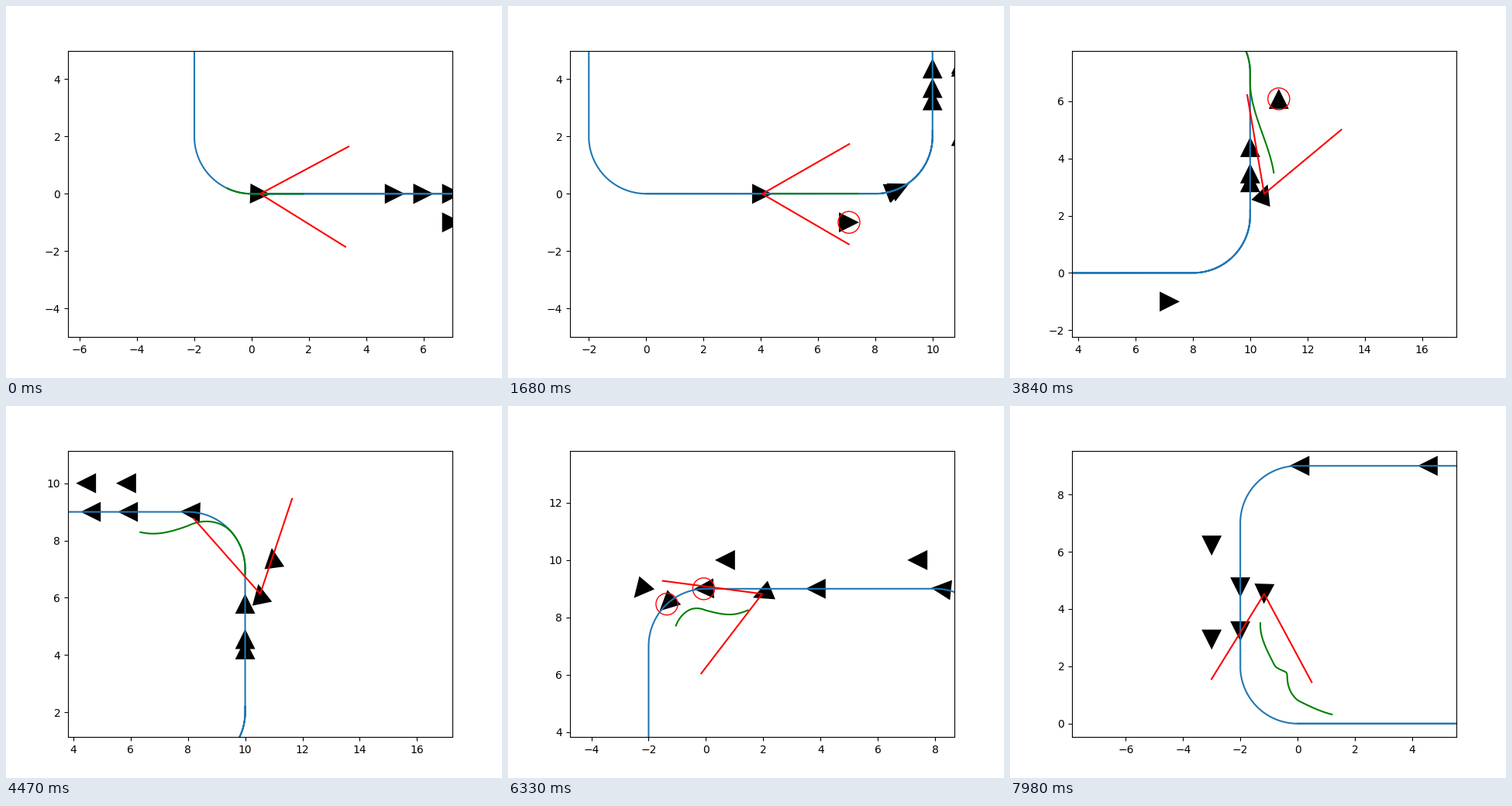
A matplotlib script for the animation above (8000 ms loop, 640 px wide and 480 px high).

```python
import numpy as np
import matplotlib.pyplot as plt
from matplotlib.animation import FuncAnimation
from matplotlib.patches import Circle, Polygon

FRAMES, LOOP_MS = 267, 8000
RADIUS, SIZE = 2.0, 0.35
VIEW_X, VIEW_Y = 6.71, 5.0
SIGHT, HALF_FOV = 3.5, np.radians(30)

# The lane is a rounded rectangle: four straights, each ending in a left bend
STRAIGHTS = [8, 5, 8, 5]
BEND = RADIUS * np.pi / 2
LAP = sum(STRAIGHTS) + 4 * BEND

# Start and speed per frame of the traffic in the inner and outer lane
INNER = [(5, 0.0667), (6, 0.0517), (6, 0.0493), (7, 0.0965), (8, 0.0985),
         (9, 0.0685)]
OUTER = [(7, 0.0015), (8, 0.0564), (9, 0.0835), (8, 0.0996)]
TRAFFIC = [(0, *car) for car in INNER] + [(1, *car) for car in OUTER]

# Driver: frame, distance along the lane, plan start and end ahead of it
JOURNEY = np.array([
    (0, 0.3, -1.18, 1.5), (56, 4.054, 0.35, 3.35), (96, 8.052, 0.3, 4.04),
    (128, 11.902, 0.74, 5.8), (171, 19.06, 0.65, 5.52),
    (211, 25.318, 0.5, 3.91), (243, 28.9, 0.8, 5.6), (266, 32.895, 1.02, 6.87),
]).T

# Driver's drift from the lane: distance, offset to the right, slope
DRIFT = np.array([
    (0, -0.011, 0.06), (2, 0, 0), (8.05, 0, -0.011), (11.9, 0.49, 0.368),
    (12.9, 0.8, 0), (19.06, -0.32, -0.172), (20.7, -0.69, 0), (23.6, 0.06, 0),
    (25.32, -0.18, -0.416), (28.9, -0.72, 0), (33, -0.831, 0.038),
]).T

# Planned swerves: distance and offset, eased from one to the next
SWERVES = np.array([
    (9.6, 0), (12.2, 0.86), (15.8, 0), (17.5, 0), (20.5, -0.76), (23.3, 0),
    (24, 0), (26.45, -0.9), (28.1, -0.615), (30, -0.8), (34, -0.7),
    (36.5, -1.55), (40.3, -0.25),
]).T


def hermite(xs, ys, slopes, x):
    x = np.clip(x, xs[0], xs[-1])
    k = np.clip(np.searchsorted(xs, x, side="right") - 1, 0, len(xs) - 2)
    h = xs[k + 1] - xs[k]
    u = (x - xs[k]) / h
    ease = u * u * (3 - 2 * u)
    return (ys[k] + (ys[k + 1] - ys[k]) * ease
            + u * (1 - u) * h * ((1 - u) * slopes[k] - u * slopes[k + 1]))


def track(s, d=0.0):
    """Position and heading at distance s, d units right of the lane."""
    u = np.mod(s, LAP) + 0 * d
    x, y, heading = np.zeros((3,) + np.shape(u))
    x0 = y0 = h = 0.0
    for length in STRAIGHTS:
        c, n = np.cos(h), np.sin(h)
        x1, y1 = x0 + length * c, y0 + length * n
        cx, cy = x1 - RADIUS * n, y1 + RADIUS * c
        a = h + (u - length) / RADIUS
        parts = [(u >= 0) & (u < length), (u >= length) & (u < length + BEND)]
        x = np.select(parts, [x0 + u * c + d * n,
                              cx + (RADIUS + d) * np.sin(a)], x)
        y = np.select(parts, [y0 + u * n - d * c,
                              cy - (RADIUS + d) * np.cos(a)], y)
        heading = np.select(parts, [h, a], heading)
        x0, y0 = x1 + RADIUS * (c - n), y1 + RADIUS * (c + n)
        h += np.pi / 2
        u = u - length - BEND
    return x, y, heading


def drive(i):
    """Driver's distance, position and heading."""
    times, dist = JOURNEY[:2]
    s = hermite(times, dist, np.gradient(dist, times), i)
    around = s + np.array([-0.001, 0, 0.001])
    x, y, _ = track(around, hermite(*DRIFT, around))
    return s, x[1], y[1], np.arctan2(y[2] - y[0], x[2] - x[0])


def plan(i, s):
    times, _, near, far = JOURNEY
    ahead = s + np.linspace(np.interp(i, times, near),
                            np.interp(i, times, far), 61)
    dist, offset = SWERVES
    return track(ahead, hermite(dist, offset, 0 * dist, ahead))[:2]


def triangle(x, y, heading):
    c, n = np.cos(heading), np.sin(heading)
    shape = SIZE * np.array([(1, 0), (-1, 1), (-1, -1)])
    return shape @ np.array([(c, n), (-n, c)]) + (x, y)


def add_robot():
    return ax.add_patch(Polygon(np.zeros((3, 2)), fc="black", lw=0))


fig, ax = plt.subplots(figsize=(6.4, 4.8), dpi=100)

robots = [add_robot() for _ in TRAFFIC]
driver = add_robot()
rings = [ax.add_patch(Circle((0, 0), 0.38, fill=False, ec="red", lw=1))
         for _ in TRAFFIC]

lane_x, lane_y, _ = track(np.linspace(0, LAP + 8 + BEND + 0.2, 1000))
ax.plot(lane_x, lane_y, color="C0", lw=1.5)
path, = ax.plot([], [], color="green", lw=1.5)
sight, = ax.plot([], [], color="red", lw=1.5)


def update(i):
    s, x, y, heading = drive(i)
    driver.set_xy(triangle(x, y, heading))

    for robot, ring, (lane, start, speed) in zip(robots, rings, TRAFFIC):
        rx, ry, rh = track(start + speed * i, lane)
        robot.set_xy(triangle(rx, ry, rh))
        bearing = np.arctan2(ry - y, rx - x) - heading
        ring.center = (float(rx), float(ry))
        ring.set_visible(bool(np.hypot(rx - x, ry - y) < SIGHT
                              and np.cos(bearing) > np.cos(HALF_FOV + 0.01)))

    path.set_data(*plan(i, s))
    left, right = heading + HALF_FOV, heading - HALF_FOV
    sight.set_data([x + SIGHT * np.cos(left), x, x + SIGHT * np.cos(right)],
                   [y + SIGHT * np.sin(left), y, y + SIGHT * np.sin(right)])
    ax.set_xlim(x - VIEW_X, x + VIEW_X)
    ax.set_ylim(y - VIEW_Y, y + VIEW_Y)
    return [*robots, driver, *rings, path, sight]


anim = FuncAnimation(fig, update, frames=FRAMES, interval=LOOP_MS / FRAMES,
                     repeat=True, repeat_delay=0, blit=False)
plt.show()
```
